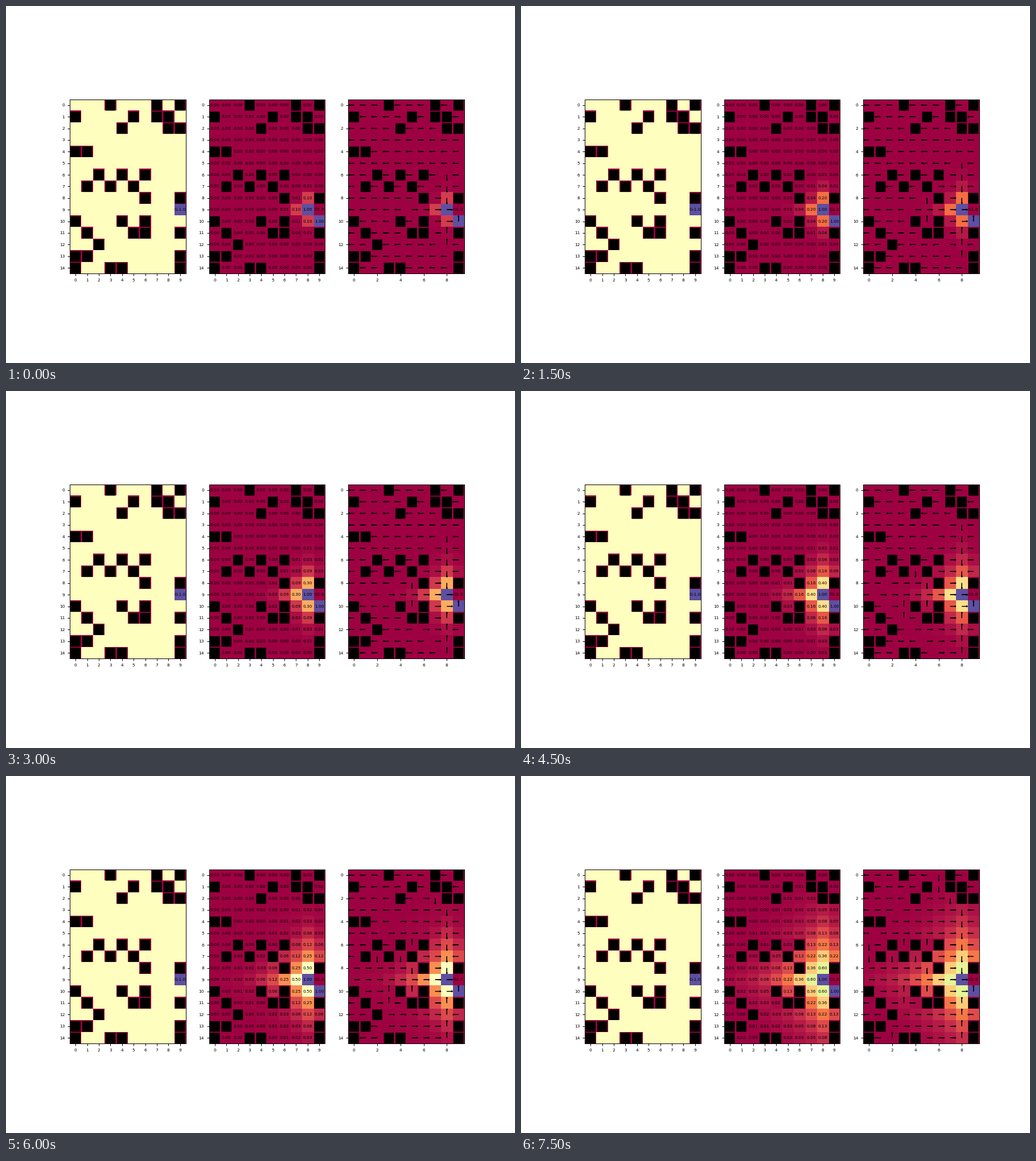
These frames come from a looping animation (894 px wide and 626 px high, 8 s). A matplotlib script:

```python
import numpy as np
import matplotlib.pyplot as plt
from matplotlib.animation import FuncAnimation
from matplotlib.patches import Rectangle

plt.rcParams["font.family"] = "DejaVu Sans"
plt.rcParams["font.size"] = 6

WIDTH, HEIGHT, DPI = 894, 626, 89.4
ROWS, COLS = 15, 10
GOAL = (9, 9)
WALLS = {
    0: (3, 7, 9), 1: (0, 5, 7, 8), 2: (4, 8, 9), 4: (0, 1),
    6: (2, 4, 6), 7: (1, 3, 5), 8: (6, 9), 10: (0, 4, 6),
    11: (1, 5, 6, 9), 12: (2,), 13: (0, 1, 9), 14: (0, 3, 4, 9),
}
MOVES = [(0, -1), (0, 1), (-1, 0), (1, 0)]  # left, right, up, down
GAMMAS = [0.1, 0.2, 0.3, 0.4, 0.5, 0.6]
TOLERANCE = 0.01
STEP_MS, LOOP_MS, TICK_MS = 1500, 8000, 500

wall = np.zeros((ROWS, COLS), bool)
for row, cols in WALLS.items():
    wall[row, list(cols)] = True
free = [(r, c) for r in range(ROWS) for c in range(COLS)
        if not wall[r, c] and (r, c) != GOAL]


def move_value(values, cell, move, gamma):
    r, c = cell[0] + move[0], cell[1] + move[1]
    if (r, c) == GOAL:
        return 1.0
    if not (0 <= r < ROWS and 0 <= c < COLS) or wall[r, c]:
        return 0.0
    return gamma * values[r, c]


def solve(gamma):
    """Value iteration; returns the values and the best move per free cell."""
    values = np.zeros((ROWS, COLS))
    while True:
        new, policy = np.zeros_like(values), {}
        for cell in free:
            scores = [move_value(values, cell, m, gamma) for m in MOVES]
            best = int(np.argmax(scores))
            policy[cell], new[cell] = MOVES[best], scores[best]
        change = np.linalg.norm(new - values)
        values = new
        if change < TOLERANCE:
            return values, policy


def label(ax, r, c, text):
    return ax.text(c, r, text, ha="center", va="center", color="black")


def make_panel(ax, data, vmin, goal_text, tick_step):
    image = ax.imshow(data, cmap="Spectral", vmin=vmin, vmax=1)
    ax.set_xticks(range(0, COLS, tick_step))
    ax.set_yticks(range(0, ROWS, tick_step))
    w, h, drop = 0.86, 0.91, 0.02
    for r, c in np.argwhere(wall):
        ax.add_patch(Rectangle((c - w / 2, r - h / 2 + drop), w, h,
                               fc="black", lw=0, snap=False, zorder=2))
    label(ax, *GOAL, goal_text)
    return image


solutions = [solve(g) for g in GAMMAS]

fig, (ax_map, ax_val, ax_pol) = plt.subplots(
    1, 3, figsize=(WIDTH / DPI + 1e-9, HEIGHT / DPI + 1e-9), dpi=DPI)
# a fraction of a pixel right and down, so the frames snap to the right pixels
dx, dy = 0.3 / WIDTH, 0.3 / HEIGHT
fig.subplots_adjust(left=0.125 + dx, right=0.9 + dx,
                    bottom=0.11 - dy, top=0.88 - dy)

world = np.where(wall, -1.0, 0.0)
world[GOAL] = 1
blank = np.zeros((ROWS, COLS))
make_panel(ax_map, world, -1, "G-1.0", 1)
val_image = make_panel(ax_val, blank, 0, "G1.0", 1)
pol_image = make_panel(ax_pol, blank, 0, "G1.0", 2)
numbers = {cell: label(ax_val, *cell, "0.00") for cell in free}
arrows = []


def update(i):
    values, policy = solutions[i * TICK_MS // STEP_MS]
    val_image.set_data(values)
    pol_image.set_data(values)
    for cell, text in numbers.items():
        text.set_text(f"{values[cell]:.2f}")
    while arrows:
        arrows.pop().remove()
    for (r, c), (dr, dc) in policy.items():
        arrows.append(ax_pol.arrow(c, r, 0.4 * dc, 0.4 * dr, fc="black",
                                   ec="black", head_width=0.1,
                                   head_length=0.1, zorder=3))
    ax_pol.set_xlim(-0.5, COLS - 0.5)
    ax_pol.set_ylim(ROWS - 0.5, -0.5)
    return []


anim = FuncAnimation(fig, update, frames=LOOP_MS // TICK_MS, interval=TICK_MS,
                     init_func=lambda: update(0), repeat=True,
                     repeat_delay=0, blit=False)
plt.show()
```
